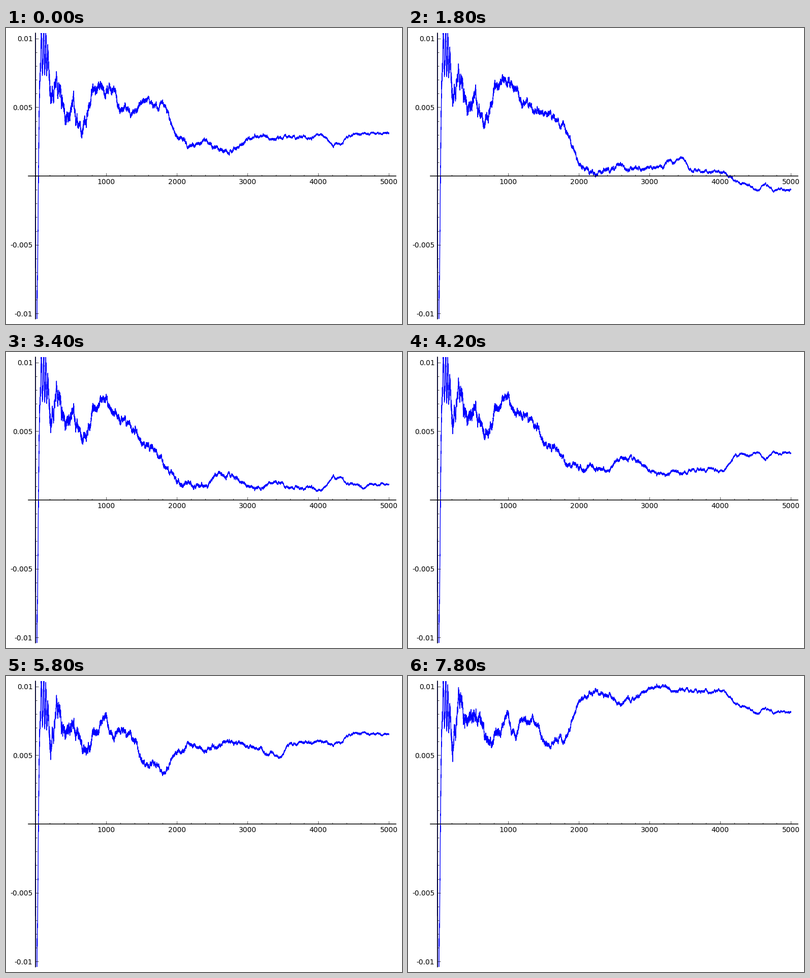
A matplotlib script that plays this animation: 779 by 584 pixels, repeating every 8 s.

```python
import numpy as np
import matplotlib.pyplot as plt
from matplotlib.animation import FuncAnimation

W, H, DPI = 779, 584, 100
FRAMES, STEP = 40, 200
N = 5000
TURN = 2.4e-4  # rad per second and unit of x

plt.rcParams["font.family"] = "DejaVu Sans"
plt.rcParams["font.size"] = 10

# Heights are in thousandths. The steep start stands still.
START = [(0, 30), (1, -7), (2, -2.9), (3, -4.6), (6, -30), (14, -30),
         (22, -10.4), (50, 3.5), (66, 8)]

# Each stretch ends at x and climbs by size * cos(TURN * mid * t - phase).
SWINGS = [
    (175, 3.5, -1.49), (216, -2.9, 0), (295, 6.6, 1.28), (425, 3.26, 2.83),
    (540, 2.2, -0.53), (570, 2.43, 2.82), (655, 0.8, 3.0), (725, 2.08, -0.96),
    (840, 2.39, 0.28), (990, 1.53, 2.12), (1110, 2.0, -1.15),
    (1240, 1.8, 2.75), (1510, -2.45, 1.82), (1780, -0.75, 1.58),
    (2000, -3.2, 0.68), (2250, -0.9, 0.4), (2740, 1.05, 2.12),
    (3100, -1.45, 2.87), (3300, 0.65, 1.92), (3620, -0.9, 1.66),
    (4050, 0.15, 0.28), (4210, 1.2, 3.96), (4600, -0.85, 3.07),
    (5000, 0.3, 5.06),
]

start_x, start_y = np.array(START).T
end, size, phase = np.array(SWINGS).T
mid = (end + np.append(start_x[-1], end[:-1])) / 2
knots = np.append(start_x, end).astype(int)

X = np.arange(N + 1)
GRAIN = 0.12 / (X + 300)
SPIN = np.random.default_rng(7).uniform(0, 2 * np.pi, N + 1)
RIPPLE = (1.6e-3 * np.cos(2 * np.pi * (X - 146) / 31)
          * np.exp(-((X - 125) / 60) ** 4))


def curve(t):
    """Swinging stretches roughened by a walk that is pinned at the knots."""
    climb = size * np.cos(TURN * mid * t - phase)
    heights = np.append(start_y, start_y[-1] + np.cumsum(climb)) / 1000
    step = GRAIN * np.cos(SPIN + TURN * X * t)
    walk = np.cumsum(step)
    return RIPPLE + walk + step + np.interp(X, knots, heights - walk[knots])


fig = plt.figure(figsize=(W / DPI, H / DPI), dpi=DPI, facecolor="white")
ax = fig.add_axes([44.1 / W, 1 - 574.2 / H, 723 / W, 564.2 / H])
ax.set_xlim(-100, 5100)
ax.set_ylim(-0.0104, 0.0104)
ax.set_axisbelow(False)
for side in ("top", "right"):
    ax.spines[side].set_visible(False)
for side in ("left", "bottom"):
    ax.spines[side].set_position("zero")
    ax.spines[side].set_linewidth(1.1)

xs = range(1000, N + 1, 1000)
ys = [-0.01, -0.005, 0.005, 0.01]
ax.set_xticks(xs, [str(v) for v in xs])
ax.set_yticks(ys, [f"{v:g}" for v in ys])
ax.set_xticks(range(200, N + 1, 200), minor=True)
ax.set_yticks(np.arange(-10, 11) / 1000, minor=True)
ax.tick_params(which="major", direction="in", length=4, width=0.5, pad=4)
ax.tick_params(which="minor", direction="in", length=2, width=0.5)
ax.tick_params(axis="x", pad=3.5)

line, = ax.plot(X, curve(0), color="#0000ff", lw=1)


def draw(i):
    line.set_ydata(curve(i * STEP / 1000))
    return line,


anim = FuncAnimation(fig, draw, frames=FRAMES, interval=STEP, repeat=True,
                     repeat_delay=0, blit=False)
plt.show()
```
